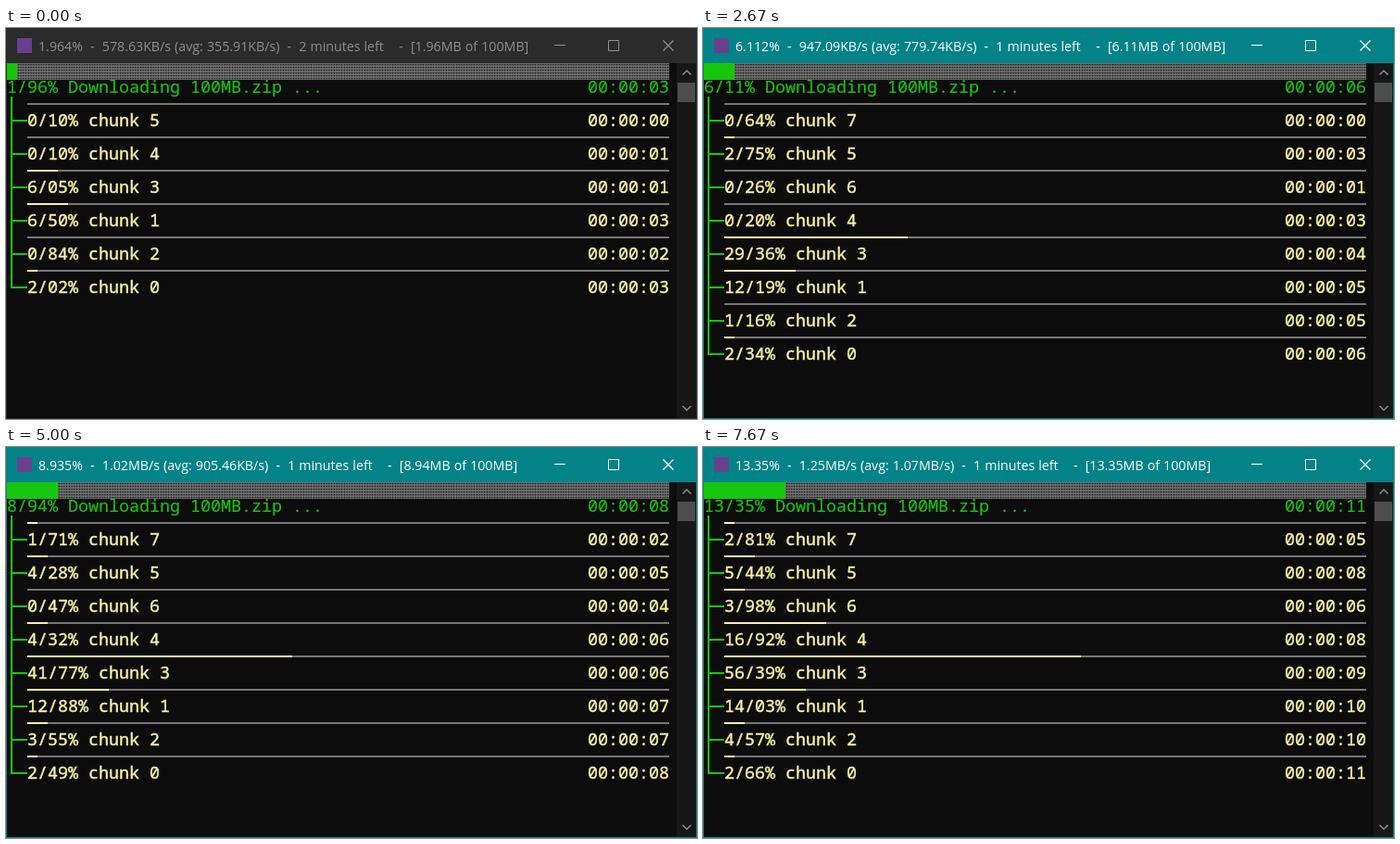
Recreate the animation shown at these times as an HTML page. Size 746 by 422 pixels, loop 8 s.

```html
<!DOCTYPE html>
<html lang="en">
<head>
<meta charset="utf-8">
<title>Console download</title>
<style>
  html, body { margin: 0; width: 100%; height: 100%; overflow: hidden; background: #0c0c0c; }
  #win { position: relative; width: 746px; height: 422px; overflow: hidden; --frame: #038387; --ink: #fff; }
  #win.idle { --frame: #2b2b2b; --ink: #8e8e8e; }
  svg { position: absolute; inset: 0; display: block; }
  #title {
    position: absolute; left: 35px; top: 0; width: 532px; height: 38px;
    font: 14.2px/39px "Open Sans", "Noto Sans", sans-serif; word-spacing: .4px;
    color: var(--ink); white-space: pre; overflow: hidden; text-overflow: ellipsis;
  }
  .frame { fill: var(--frame); }
  .buttons { fill: none; stroke: var(--ink); }
  .close { stroke-width: 1.3; }
  .arrows { fill: none; stroke: #8a8a8a; stroke-width: 1.5; }
  text { font: 18.333px "Noto Sans Mono", "DejaVu Sans Mono", monospace; white-space: pre; }
  .green { fill: #16c60c; }
  .yellow { fill: #f9f1a5; }
  .gray { fill: #767676; }
  text.yellow { stroke: #f9f1a5; stroke-width: .45; }
  text.green { stroke: #16c60c; stroke-width: .15; }
</style>
</head>
<body>
<div id="win">
  <svg width="746" height="422" viewBox="0 0 746 422">
    <defs>
      <pattern id="shade" x="1" y="38" width="2.75" height="3" patternUnits="userSpaceOnUse">
        <rect width="2.75" height="3" fill="#767676"/>
        <rect x=".6" y=".8" width="1.5" height="1.5" fill="#0c0c0c"/>
      </pattern>
    </defs>
    <rect class="frame" width="746" height="422"/>
    <rect x="1" y="38" width="744" height="383" fill="#0c0c0c"/>
    <rect x="12" y="11" width="16" height="16" fill="#68408f"/>
    <path class="buttons" d="M592 18.5h12M650.5 13.5h11v11h-11z"/>
    <path class="buttons close" d="M709.5 13.5l11 11M720.5 13.5l-11 11"/>
    <rect x="724" y="38" width="21" height="383" fill="#171717"/>
    <rect x="725" y="59" width="19" height="21" fill="#4d4d4d"/>
    <path class="arrows" d="M730.5 50.5l4.5-4.5 4.5 4.5M730.5 408l4.5 4.5 4.5-4.5"/>
    <g id="screen"></g>
  </svg>
  <div id="title"></div>
</div>
<script>
const STEPS = 24, LOOP = 8000, CELL = 11, COLS = 65;
const win = document.getElementById('win');
const title = document.getElementById('title');
const screen = document.getElementById('screen');

// Top to bottom. start: timer offset in seconds; path: [step, percent] joined by straight lines.
const chunks = [
  { id: 7, start: -2.2, from: 7, path: [[0, 0], [8, .64], [13, .93], [17, 2.49], [20, 2.81]] },
  { id: 5, start: .41, path: [[3, .1], [8, 2.75], [13, 3.22], [17, 5.34], [20, 5.44]] },
  { id: 6, start: -.9, from: 3, path: [[3, .1], [20, .63], [23, 3.98]] },
  { id: 4, start: 1.1, pause: 3, path: [[0, .1], [8, .2], [13, 1.5], [17, 7.14], [20, 13.24], [23, 16.92]] },
  { id: 3, start: 1.8, path: [[0, 6.05], [3, 21.31], [13, 37.41], [20, 52.68], [23, 56.39]] },
  { id: 1, start: 3.02, path: [[0, 6.5], [3, 11.69], [17, 13.08], [20, 13.08], [23, 14.03]] },
  { id: 2, start: 2.5, path: [[3, .84], [8, 1.16], [13, 3.42], [20, 3.89], [23, 4.57]] },
  { id: 0, start: 3.43, path: [[3, 2.02], [8, 2.34], [23, 2.66]] }
];
const speed = [[0, 578.63], [3, 2222.08], [8, 947.09], [13, 1085.44], [17, 996.24], [20, 2170.88], [23, 1280]];

function at(path, n) {
  const i = path.findIndex(p => p[0] > n);
  if (i < 0) return path[path.length - 1][1];
  if (i === 0) return path[0][1];
  const [n0, v0] = path[i - 1], [n1, v1] = path[i];
  return v0 + (v1 - v0) * (n - n0) / (n1 - n0);
}

// The file is split into equal chunks, so the whole is their mean.
const total = n => chunks.reduce((sum, c) => sum + at(c.path, n), 0) / chunks.length;

const short = (v, digits = 2) => String(+v.toFixed(digits));
const rate = kb => kb >= 1024 ? short(kb / 1024) + 'MB/s' : short(kb) + 'KB/s';
const percent = v => v.toFixed(2).replace('.', '/') + '%';
const clock = s => '00:00:' + String(Math.max(0, Math.floor(s))).padStart(2, '0');
const rect = (x, y, w, h, cls) => `<rect x="${x}" y="${y}" width="${w}" height="${h}" class="${cls}"/>`;
const text = (col, top, str, cls) =>
  `<text x="${1 + col * CELL}" y="${top + 14}" class="${cls}">${str}</text>`;
const bar = (pct, cols) => Math.floor(pct * cols / 100) * CELL;

function titleText(done, now, kb) {
  const average = done * 1024 / (5.65 + .9 * now);
  const secs = (100 - done) / (kb / 1024);
  const left = secs < 60 ? Math.floor(secs) + ' seconds' : Math.floor(secs / 60) + ' minutes';
  return `${short(done, 3)}%  -  ${rate(kb)} (avg: ${rate(average)})` +
    `  -  ${left} left    -  [${short(done)}MB of 100MB]`;
}

function draw(n) {
  const now = n * .33, done = total(n);
  let out = `<rect x="1" y="38" width="${COLS * CELL}" height="18" fill="url(#shade)"/>` +
    rect(1, 38, bar(done, COLS), 18, 'green') +
    text(0, 56, percent(done) + ' Downloading 100MB.zip ...', 'green') +
    text(57, 56, clock(now + 3.8), 'green');

  const rows = chunks.filter(c => n >= (c.from || 0) && n !== c.pause);
  rows.forEach((c, i) => {
    const top = 74 + i * 36, pct = at(c.path, n);
    out += rect(23, top + 7, 63 * CELL, 2, 'gray') +
      rect(23, top + 7, bar(pct, 63), 2, 'yellow') +
      rect(6, top + 25, 17, 2, 'green') +
      text(2, top + 18, `${percent(pct)} chunk ${c.id}`, 'yellow') +
      text(57, top + 18, clock(now + c.start), 'yellow');
  });
  out += rect(5, 74, 2, rows.length * 36 - 9, 'green');

  screen.innerHTML = out;
  title.textContent = titleText(done, now, at(speed, n));
  win.classList.toggle('idle', n === 0);
}

let last = -1;
const begin = performance.now();
function tick() {
  const t = Math.max(0, performance.now() - begin);
  const n = Math.floor((t + 4) * STEPS / LOOP) % STEPS;
  if (n !== last) draw(last = n);
  requestAnimationFrame(tick);
}
tick();
</script>
</body>
</html>
```
